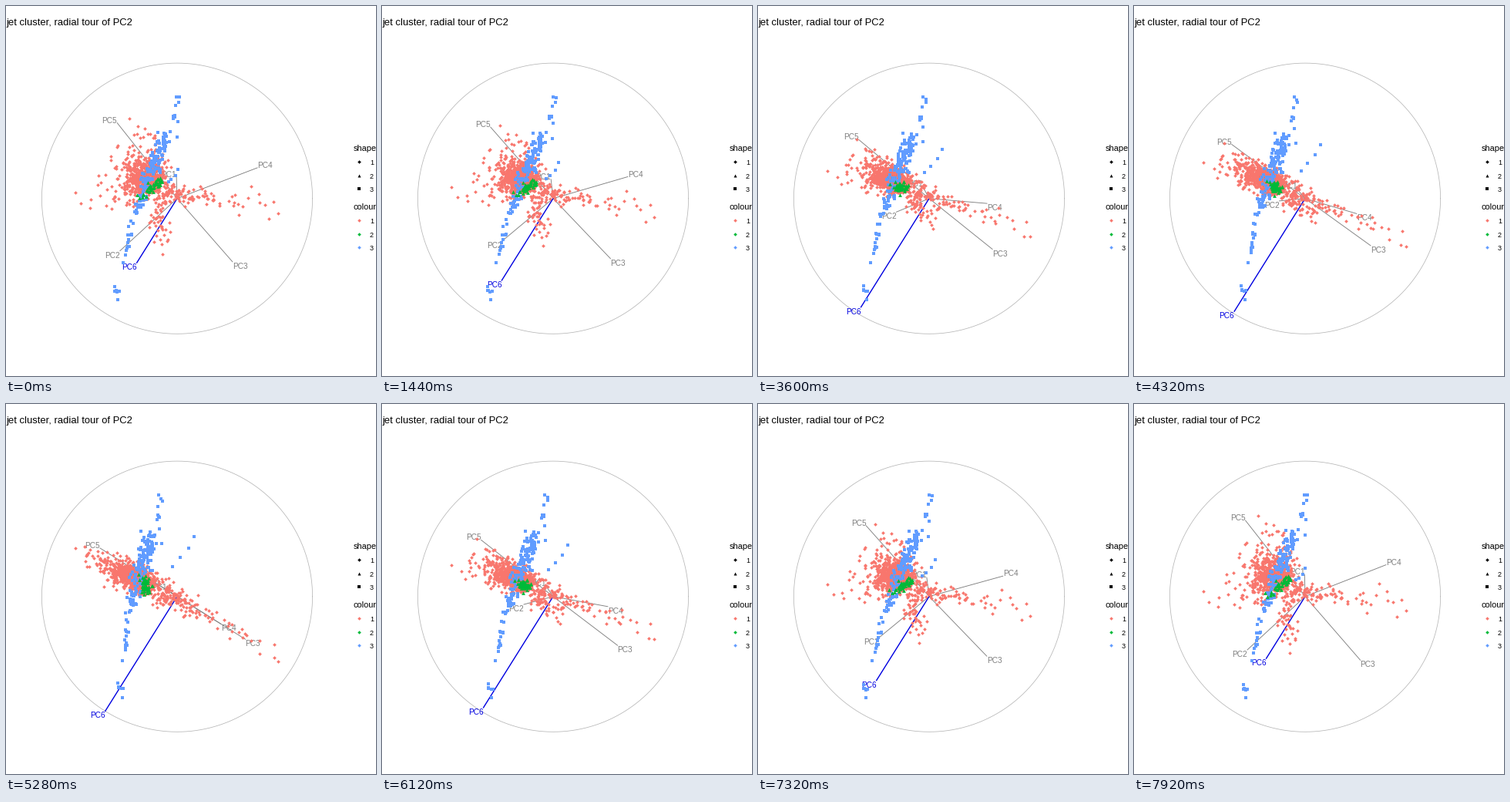
A matplotlib script that plays this animation: 480x480 px, repeating every 8 s.

```python
import numpy as np
import matplotlib.pyplot as plt
from matplotlib.animation import FuncAnimation

plt.rcParams["font.family"] = "Liberation Sans"
SIZE, DPI, STEP_MS, LOOP_MS = 480, 72, 40, 8000
CX, CY, R = 222, 249.7, 175.6
SPAN = 1.5 * R
TILT = np.radians(32.1)
V = np.array([np.cos(TILT), np.sin(TILT)])     # fixed direction on screen
U = np.array([-np.sin(TILT), np.cos(TILT)])    # direction of the turning axis
RED, GREEN, BLUE = "#F8766D", "#00BA38", "#619CFF"
GREY, MANIP = "#7F7F7F", "#0000E0"

# (share along V, share along U at a right angle) in pixels
AXES = {"PC1": (-15.6, -28), "PC2": (-26.7, 117), "PC3": (104.5, 37.9),
        "PC4": (67, -107.5), "PC5": (-118, -50.4)}

rng = np.random.default_rng(6)

# Every point is (p, q, r): p along V, q along the turning axis,
# r along the direction it turns away from.


def red_points():
    core = rng.normal(-60, 15, 500)
    halo = np.clip(rng.normal(-72, 27, 230), -128, -27)
    tail = np.minimum(-22 + rng.exponential(40, 95), 100)
    far = np.linspace(75, 148, 9)
    drop = rng.uniform(-30, 27, 42)
    p = np.r_[core, halo, tail, far, drop]
    q = 4 - 0.07 * p + rng.normal(0, 8, p.size)
    spread = rng.normal(size=p.size)
    centre = np.r_[0 * core - 9, 0 * halo - 9, -12 - 0.48 * tail,
                   -18 - 0.4 * far, 57 + 1.1 * drop]
    width = np.r_[0 * core + 17, 10 + 0.45 * np.abs(halo + 20),
                  0 * tail + 9, 0 * far + 18, 0 * drop + 14]
    r = np.clip(centre + width * spread, -94, 100)
    ends = [(-145.3, 16.7, 84), (-136, 9, -95), (31, 5, 106), (155.6, 1.6, -84)]
    return np.vstack([np.c_[p, q, r], ends])


def blue_points():
    t = np.r_[np.clip(rng.normal(-25, 18, 95), -62, 30),
              rng.uniform(0, 40, 35), rng.uniform(35, 80, 16)]
    clumps = ((-94, 3), (-75, 4), (90, 6), (112, 1), (141, 5))
    t = np.r_[t, [c + rng.normal(0, 3) for c, n in clumps for _ in range(n)]]
    noise = rng.normal(size=(2, t.size)) * np.where(np.abs(t) > 65, 0.4, 1)
    main = np.c_[-57 + 0.33 * t + 0.0006 * t**2 + 5.5 * noise[0], t,
                 1.02 * t - 15 + 8 * noise[1]]
    side = rng.normal((-23, -50, 1), (1.5, 9, 2), (4, 3))
    ends = [(-90.4, -99.1, -108.4), (9.5, 148.7, 134.9)]
    return np.vstack([main, side, ends])


def green_points(n=46):
    d = rng.normal(0, 5, n)
    return np.c_[d - 43 + rng.normal(0, 2.5, n),
                 9.5 + 0.5 * d + rng.normal(0, 4, n),
                 -3 - 3 * d + rng.normal(0, 8, n)]


groups = [red_points(), blue_points(), green_points()]
points = np.vstack(groups)
splits = np.cumsum([len(g) for g in groups])[:-1]


def angle(ms):
    """Angle left between the turning axis and the screen plane."""
    if ms < 5640:
        step = max(0, (ms - 480) // 240)
        return max(0.0, 0.976 - 0.05 * step)
    return 0.05 * (1 + (ms - 5640) // 120)


def project(a):
    """Flatten the cloud and stretch it to fill the same box each time."""
    p, q, r = points.T
    xy = np.outer(p, V) + np.outer(q * np.cos(a) + r * np.sin(a), U)
    low, high = xy.min(0), xy.max(0)
    return (CX - 0.4, CY - 0.2) + SPAN * ((xy - low) / (high - low) - 0.5)


fig = plt.figure(figsize=(SIZE / DPI, SIZE / DPI), dpi=DPI, facecolor="white")
ax = fig.add_axes([0, 0, 1, 1])
ax.set(xlim=(0, SIZE), ylim=(SIZE, 0))
ax.axis("off")


def write(x, y, s, size, color="black", **kw):
    return ax.text(x, y, s, size=size, color=color, va="baseline", **kw)


def dots(x, y, marker, color, size):
    return ax.plot(x, y, marker, color=color, ms=size, mew=0, ls="none",
                   antialiased=False, zorder=4)[0]


turn = np.linspace(0, 2 * np.pi, 361)
ax.plot(CX + R * np.cos(turn), CY + R * np.sin(turn), color="#B4B4B4",
        lw=0.75, zorder=1)

write(0, 25, "jet cluster, radial tour of PC2", 13)
write(450.5, 188, "shape", 11)
write(450.5, 264, "colour", 11)
for i, (mark, color) in enumerate(zip("D^s", (RED, GREEN, BLUE))):
    y = 202 + 17.5 * i
    dots([458], [y], mark, "black", 3.2 if mark == "D" else 4)
    dots([458], [y + 76], "D", color, 3.2)
    write(472, y + 4, str(i + 1), 9)
    write(472, y + 80, str(i + 1), 9)

spokes = {}
for name in [*AXES, "PC6"]:
    color, width = (MANIP, 1.4) if name == "PC6" else (GREY, 0.9)
    line, = ax.plot([], [], color=color, lw=width, zorder=2)
    spokes[name] = line, write(0, 0, name, 10, color, zorder=3)

clouds = [dots([], [], m, c, s) for m, c, s in
          (("D", RED, 3.3), ("s", BLUE, 4), ("^", GREEN, 4.8))]


def draw(i):
    a = angle(i * STEP_MS)
    for name, (line, label) in spokes.items():
        if name == "PC6":
            v, u = 0, R * np.cos(a)
        else:
            v, c = AXES[name]
            u = c * np.sin(a)
        dx, dy = v * V + u * U
        x, y = CX + dx, CY + dy
        line.set_data([CX, x], [CY, y])
        label.set_position((x, y + 9 if dy > 0 else y))
        label.set_ha("left" if dx > 0 else "right")
    for cloud, xy in zip(clouds, np.split(project(a), splits)):
        cloud.set_data(xy[:, 0], xy[:, 1])
    return clouds


anim = FuncAnimation(fig, draw, frames=LOOP_MS // STEP_MS, interval=STEP_MS,
                     repeat=True, repeat_delay=0)
plt.show()
```
